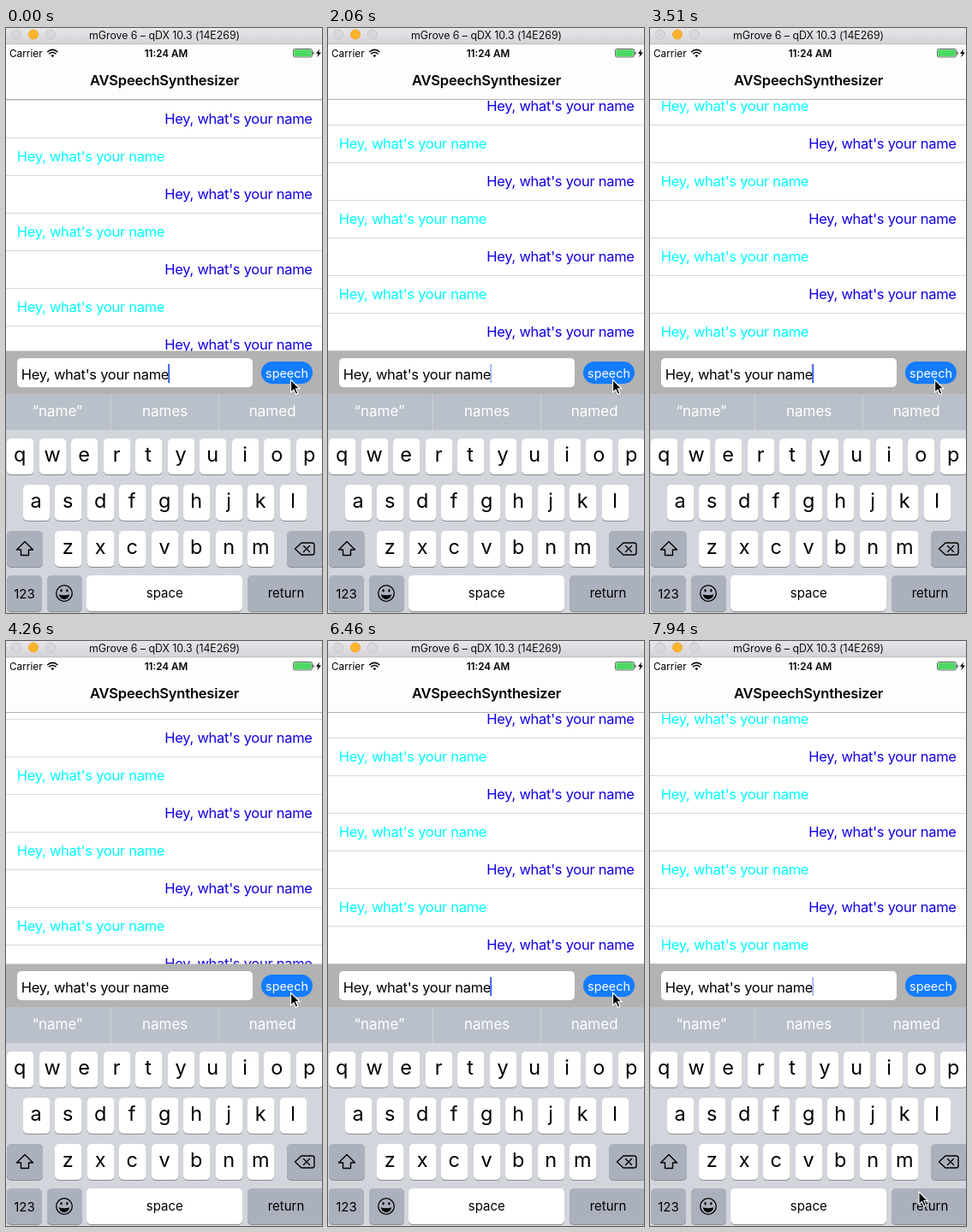
Write an HTML page that moves like this. It is 369x684 px and loops after 8000 ms.

```html
<!DOCTYPE html>
<html lang="en">
<head>
<meta charset="utf-8">
<title>Speech chat</title>
<style>
  html, body { margin: 0; width: 100%; height: 100%; overflow: hidden; background: #fff; }
  svg { display: block; width: 100%; height: 100%; }
  text { font-family: Inter, Roboto, sans-serif; white-space: pre; }
</style>
</head>
<body>
<svg id="stage" viewBox="0 0 369 684">
  <defs>
    <linearGradient id="bar" x1="0" y1="0" x2="0" y2="1">
      <stop offset="0" stop-color="#e8e6ea"/>
      <stop offset="1" stop-color="#d4d2d6"/>
    </linearGradient>
    <clipPath id="list"><rect y="84" width="369" height="294"/></clipPath>
  </defs>
  <rect width="369" height="684" fill="#fff"/>
  <g clip-path="url(#list)"><g id="rows"></g></g>
  <g id="top"></g>
  <g id="panel"></g>
  <g id="keys"></g>
  <path id="cursor" d="M0 0V14.6L3.4 11.5L5.8 17L8.3 15.9L5.9 10.5H10.4Z" fill="#000" stroke="#fff" stroke-width="1.1"/>
</svg>
<script>
const LOOP = 8000, STEP = 146.8, ROW = 44;
const $ = id => document.getElementById(id);

function add(parent, tag, attrs, label) {
  const el = document.createElementNS("http://www.w3.org/2000/svg", tag);
  for (const name in attrs) el.setAttribute(name, attrs[name]);
  if (label !== undefined) el.textContent = label;
  parent.appendChild(el);
  return el;
}
const box = (parent, x, y, width, height, fill, rx = 0) =>
  add(parent, "rect", { x, y, width, height, fill, rx });
const label = (parent, str, x, y, size, fill = "#000", more = {}) =>
  add(parent, "text", { x, y, "font-size": size, fill, "text-anchor": "middle", ...more }, str);
const stroke = (parent, d, color, width = 1) =>
  add(parent, "path", { d, fill: "none", stroke: color, "stroke-width": width, "stroke-linejoin": "round", "stroke-linecap": "round" });

const PHRASE = "Hey, what's your name";
const BODY = { "letter-spacing": -0.28 };

function buildRows(g) {
  for (let j = -1; j < 9; j++) {
    const y = 361 - ROW * j, mine = j % 2 === 0;
    label(g, PHRASE, mine ? 357.7 : 12.8, y, 16.5, mine ? "#1200e0" : "#00ffff",
      { ...BODY, "text-anchor": mine ? "end" : "start" });
    box(g, 0, y + 16, 369, 1, "#d9d9dc");
  }
}

function buildTop(g) {
  box(g, 0, 0, 369, 19, "url(#bar)");
  box(g, 0, 18.5, 369, 1, "#b5b4b5");
  [["#d9d7db", "#c2c0c4"], ["#fdb42b", "#e6a52c"], ["#d9d7db", "#c2c0c4"]].forEach(([fill, edge], i) =>
    add(g, "circle", { cx: 12 + 20 * i, cy: 7.5, r: 5.6, fill, stroke: edge, "stroke-width": 0.8 }));
  label(g, "mGrove 6 – qDX 10.3 (14E269)", 185, 12.5, 12.4, "#111", { "letter-spacing": -0.05 });

  box(g, 0, 19.5, 369, 64, "#fdfdfd");
  label(g, "Carrier", 4, 33.5, 11.8, "#000", { "text-anchor": "start" });
  add(g, "path", { d: "M54.3 34.2L52.4 32.2A2.7 2.7 0 0 1 56.2 32.2Z" });
  stroke(g, "M50.6 30A5.3 5.3 0 0 1 58 30M48.7 27.7A8 8 0 0 1 59.9 27.7", "#000", 1.6);
  label(g, "11:24 AM", 187, 33.5, 11.7, "#000", { "font-weight": 600 });
  add(g, "rect", { x: 335.5, y: 24.5, width: 22, height: 9.5, rx: 1.8, fill: "none", stroke: "#444", "stroke-width": 0.8 });
  box(g, 336.3, 25.3, 20.4, 7.9, "#4cd964", 0.8);
  box(g, 358.4, 27.5, 1.2, 3.5, "#444", 0.6);
  add(g, "path", { d: "M366.2 24.5L362 30H364.6L363.2 34.5L368 28.5H365.2Z" });

  label(g, "AVSpeechSynthesizer", 185, 67, 16.5, "#000", { "font-weight": 600, "letter-spacing": -0.2 });
  box(g, 0, 83, 369, 1, "#b2b2b2");
}

function buildPanel(g) {
  box(g, 0, 377.5, 369, 51, "#b2b2b2");
  box(g, 13, 386, 275, 34, "#fff", 5);
  label(g, PHRASE, 17.8, 410.5, 16.5, "#000", { ...BODY, "text-anchor": "start" });
  const caret = box(g, 189.2, 393, 2, 22, "#3b62e6");
  box(g, 298, 390, 60, 26, "#147cff", 13);
  const speech = label(g, "speech", 328, 408.5, 14.4, "#fff");
  return { caret, speech };
}

function buildKeys(g) {
  box(g, 0, 428, 369, 42, "#b9c0c9");
  [122, 248].forEach(x => box(g, x, 428, 1, 42, "#cdd2d8"));
  ["“name”", "names", "named"].forEach((s, i) => label(g, s, 60 + 125.6 * i, 453.5, 17, "#fff"));
  box(g, 0, 470, 369, 214, "#d2d5db");

  const key = (x, y, w, fill = "#fff") => {
    box(g, x, y + 1, w, 42, "#898b90", 5);
    box(g, x, y, w, 42, fill, 5);
  };
  [["qwertyuiop", 1, 480], ["asdfghjkl", 19.5, 534], ["zxcvbnm", 57, 588]].forEach(([chars, x0, y]) =>
    [...chars].forEach((c, i) => {
      const x = Math.round(x0 + 37.5 * i);
      key(x, y, 31.5);
      label(g, c, x + 15.2, y + 27, 23.5);
    }));

  const gray = "#abb1bc";
  key(1, 588, 42, gray);
  key(328, 588, 48, gray);
  key(1, 640, 41, gray);
  key(48, 640, 41, gray);
  key(94, 640, 182);
  key(282, 640, 94, gray);

  stroke(g, "M22 600.5L31.5 610H26.5V616.5H17.5V610H12.5Z", "#000", 1.4);
  stroke(g, "M345 602H357.5Q360 602 360 604.5V613.5Q360 616 357.5 616H345L337.5 609ZM347.5 605.5L354.5 612.5M354.5 605.5L347.5 612.5", "#000", 1.4);
  add(g, "circle", { cx: 68, cy: 661, r: 9.3, fill: "none", stroke: "#000", "stroke-width": 1.3 });
  [64.6, 71.4].forEach(cx => add(g, "ellipse", { cx, cy: 657.8, rx: 1.2, ry: 1.8 }));
  add(g, "path", { d: "M61.8 662.3Q68 664 74.2 662.3Q73 668 68 668Q63 668 61.8 662.3Z" });
  label(g, "123", 21.5, 667, 15);
  label(g, "space", 185.3, 666, 15);
  label(g, "return", 327, 666, 15);
}

// Each message: time its scroll begins, time the button is pressed.
const MESSAGES = [[-182, 300], [2040, 2360], [4107, 4600], [6450, 6700]];
// Pointer path: step, x, y
const PATH = [[49, 332.6, 411.3], [50, 331, 432], [51, 321, 508], [52, 319, 575], [53, 316, 625], [54, 314, 644]];

const clamp = v => Math.min(1, Math.max(0, v));
const ease = u => u * u * (3 - 2 * u);

function listShift(t) {
  const k = MESSAGES.findLastIndex(([start]) => t >= start);
  const left = ROW * (1 - ease(clamp((t - MESSAGES[k][0]) / 300)));
  return Math.round(left) - (k % 2 ? ROW : 0);
}

function speechAlpha(t) {
  const hit = MESSAGES.find(([, press]) => t >= press && t < press + 430);
  return hit ? 0.2 + 0.8 * clamp((t - hit[1] - 200) / 220) : 1;
}

function caretAlpha(step) {
  const phase = (step - 0.01 + 6.72) % 6.72;
  if (phase < 1) return 0.45;
  if (phase < 3.35) return 0;
  return phase < 3.5 ? 0.5 : 1;
}

function pointer(step) {
  const at = PATH.findLast(p => step >= p[0]) || PATH[0];
  return `translate(${at[1]} ${at[2]})`;
}

buildRows($("rows"));
buildTop($("top"));
const { caret, speech } = buildPanel($("panel"));
buildKeys($("keys"));

function draw(ms) {
  const step = Math.floor((ms % LOOP + 14) / STEP), t = step * STEP;
  $("rows").setAttribute("transform", `translate(0 ${listShift(t)})`);
  speech.setAttribute("opacity", speechAlpha(t));
  caret.setAttribute("opacity", caretAlpha(step));
  $("cursor").setAttribute("transform", pointer(step));
}

const start = performance.now();
function tick() {
  draw(performance.now() - start);
  requestAnimationFrame(tick);
}
tick();
</script>
</body>
</html>
```
